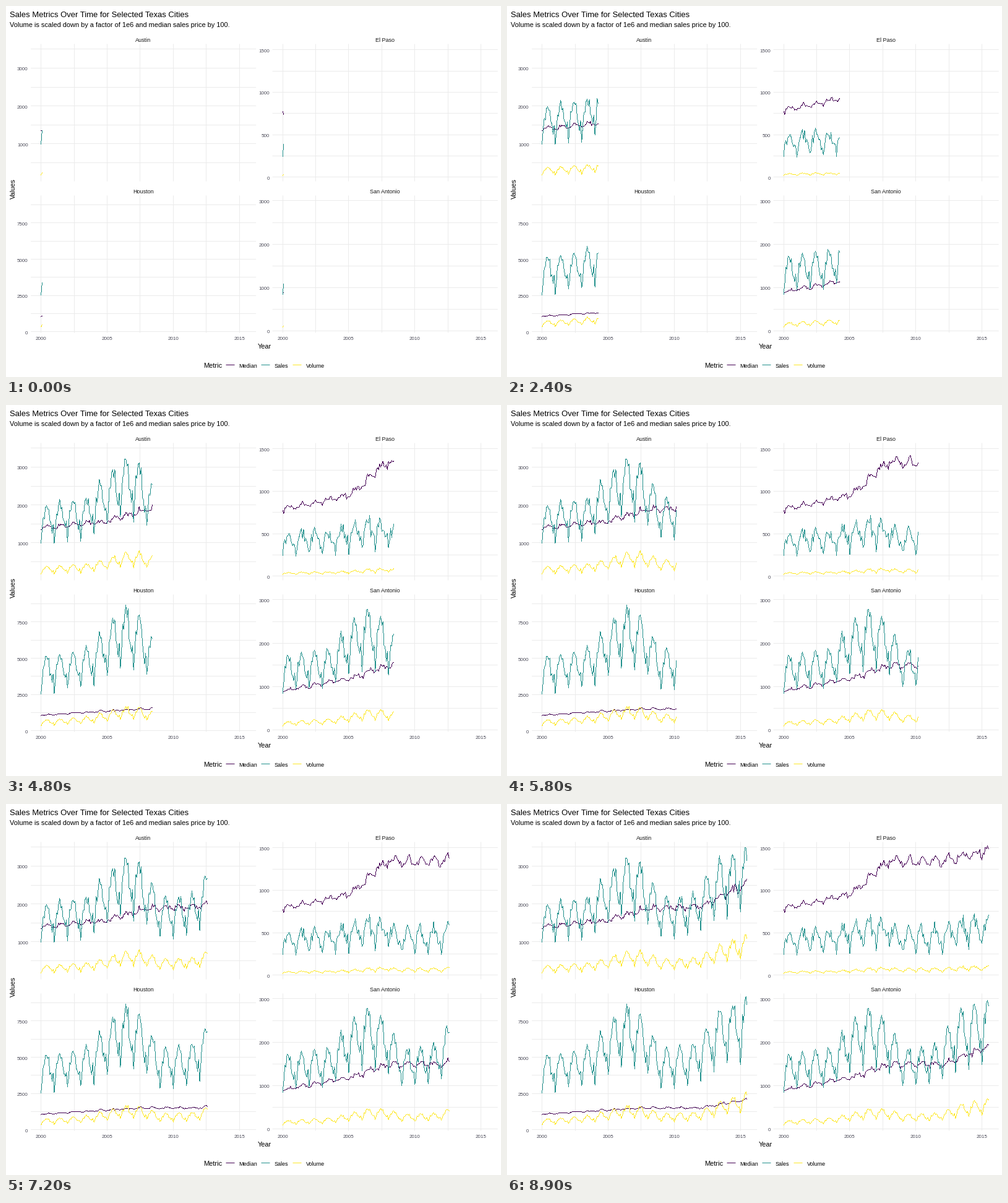
A matplotlib script for the animation above (10 s loop, 800 by 600 pixels).

```python
import numpy as np
import matplotlib.pyplot as plt
from matplotlib.animation import FuncAnimation

W, H, DPI = 800, 600, 100
FRAMES, MOVING, INTERVAL = 100, 89, 100
MONTHS = 187
PX = 72 / DPI  # one pixel in points
YEAR_PX = 21.37
PANEL_W, PANEL_H = 364, 222
COLORS = {"Median": "#440154", "Sales": "#21908C", "Volume": "#FDE725"}
GRID, TICK = "#EBEBEB", "#4D4D5A"

plt.rcParams["font.family"] = "Liberation Sans"

month = np.arange(MONTHS)
years = month / 12

# Share of the winter-to-summer rise reached in each calendar month
SEASON = np.array([0, .27, .71, .66, .93, 1, .85, .89, .5, .43, .28, .43])

# Market cycle shared by all cities: years since 2000 and relative sales
CYCLE = np.interp(years, [0, 3.5, 4.5, 6.5, 7.5, 9, 11.5, 12.5, 13.5, 15.5],
                  [.58, .64, .76, .97, .9, .63, .67, .81, .95, 1.02])
PRICE_YEARS = [0, 5, 8, 12, 16]

# y0: pixel row of value 0, k: pixels per unit, step: major grid spacing,
# peak: highest sales, calm: flattening of the cycle, rough: jaggedness
CITIES = [
    dict(name="Austin", y0=283.6, k=.0612, step=1000, peak=3450, calm=1,
         rough=.07, price=[1390, 1570, 1870, 1930, 2640], rate=1.3e-4),
    dict(name="El Paso", y0=276.4, k=.1373, step=500, peak=690, calm=.5,
         rough=.24, price=[790, 950, 1350, 1340, 1480], rate=1.07e-4),
    dict(name="Houston", y0=526.5, k=.02347, step=2500, peak=8950, calm=1,
         rough=.07, price=[1080, 1370, 1510, 1510, 2180], rate=1.31e-4),
    dict(name="San Antonio", y0=525, k=.0702, step=1000, peak=2960, calm=1,
         rough=.07, price=[900, 1180, 1490, 1490, 1950], rate=1.21e-4),
]


def series(city, rng):
    """Monthly median, sales and volume of one city."""
    share = SEASON[month % 12] + rng.uniform(-1, 1, MONTHS) * city["rough"]
    sales = city["peak"] * CYCLE ** city["calm"] * (.51 + .49 * share)
    swing = -.03 * np.cos(2 * np.pi * years) + rng.normal(0, .018, MONTHS)
    median = np.interp(years, PRICE_YEARS, city["price"]) * (1 + swing)
    return {"Median": median, "Sales": sales,
            "Volume": sales * median * city["rate"]}


def trace(xs, ys):
    """Whole pixels along a polyline, and where each vertex falls in them."""
    steps = np.ceil(np.maximum(abs(np.diff(xs)), abs(np.diff(ys))))
    ends = np.concatenate([[0], np.cumsum(steps)]).astype(int)
    walk = np.arange(ends[-1] + 1)
    return (np.round(np.interp(walk, ends, xs)),
            np.round(np.interp(walk, ends, ys)), ends)


fig = plt.figure(figsize=(W / DPI, H / DPI), dpi=DPI, facecolor="white")
ax = fig.add_axes([0, 0, 1, 1])
ax.set_xlim(-.5, W - .5)
ax.set_ylim(H - .5, -.5)
ax.axis("off")


def label(x, y, text, size, color="black", ha="left"):
    """Text whose capitals are centred on y."""
    ax.text(x, y + .36 * size, text, size=size * PX, color=color, ha=ha,
            va="baseline")


def rule(x, y, color):
    """Crisp straight line, one pixel wide."""
    ax.plot(x, y, color=color, lw=PX, snap=False, solid_capstyle="butt",
            zorder=1)


def draw_panel(city, left, top, x0):
    right, bottom = left + PANEL_W, top + PANEL_H
    for n in range(8):
        value = n * city["step"] / 2
        y = city["y0"] - city["k"] * value
        if not top < y < bottom:
            continue
        rule([left, right], [round(y)] * 2, GRID)
        if n % 2 == 0:
            label(left - 4.5, y + 1, f"{value:.0f}", 8, TICK, "right")
    for n in range(7):
        x = x0 + YEAR_PX * n * 2.5
        rule([round(x)] * 2, [top, bottom], GRID)
        if n % 2 == 0 and top > H / 2:
            label(x, 537, f"{2000 + n * 5 // 2}", 8, TICK, "center")
    label(left + PANEL_W / 2, top - 7, city["name"], 9, "#1A1A1A", "center")


label(5, 12.5, "Sales Metrics Over Time for Selected Texas Cities", 13)
label(5, 30, "Volume is scaled down by a factor of 1e6 and "
             "median sales price by 100.", 11)
label(417, 550, "Year", 11, ha="center")
ax.text(11.5, 295, "Values", size=11 * PX, rotation=90, ha="center",
        va="center")

label(319, 581, "Metric", 11)
for (name, color), x in zip(COLORS.items(), (355, 412, 463)):
    rule([x, x + 14], [580, 580], color)
    label(x + 21, 581.5, name, 9)

rng = np.random.default_rng(12)
curves = []
for i, city in enumerate(CITIES):
    left, top = 39.6 + 390.5 * (i % 2), 61 + 245 * (i // 2)
    x0 = left + 16.5
    draw_panel(city, left, top, x0)
    for name, values in series(city, rng).items():
        xs, ys, ends = trace(x0 + YEAR_PX * years,
                             city["y0"] - city["k"] * values)
        dots, = ax.plot([], [], ",", color=COLORS[name], zorder=2)
        # a quarter pixel keeps the markers clear of rounding ties
        curves.append((dots, xs - .25, ys + .25, ends))


def update(frame):
    last = min((MONTHS - 1) * frame // MOVING + 1, MONTHS - 1)
    for dots, xs, ys, ends in curves:
        stop = ends[last] + 1
        dots.set_data(xs[:stop], ys[:stop])
    return [curve[0] for curve in curves]


anim = FuncAnimation(fig, update, frames=FRAMES, interval=INTERVAL,
                     repeat=True, repeat_delay=0)
plt.show()
```
